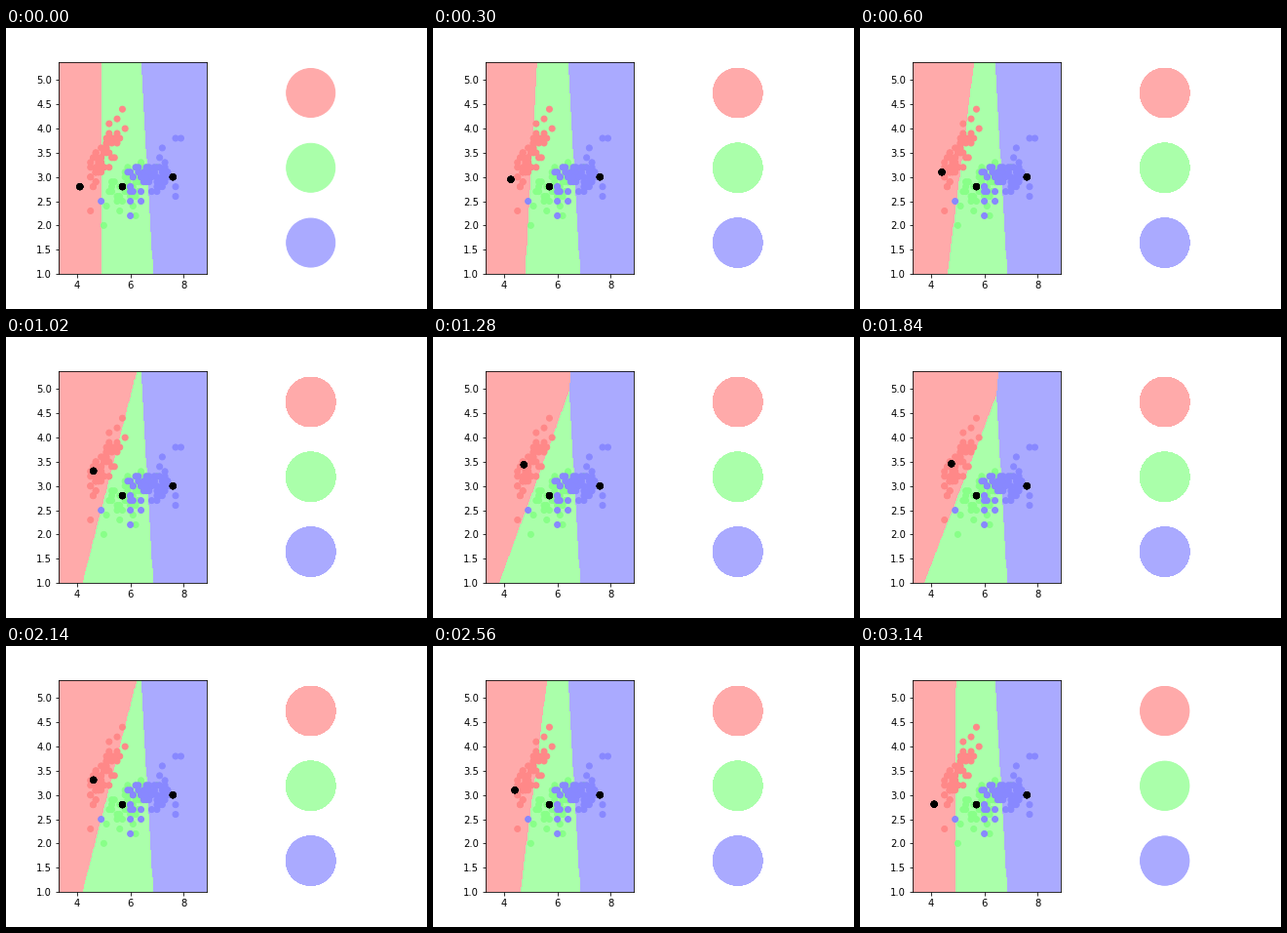
These frames come from a looping animation (432x288 px, 3160 ms). A matplotlib script:

```python
import numpy as np
import matplotlib.pyplot as plt
from matplotlib.animation import FuncAnimation
from matplotlib.colors import ListedColormap

plt.rcParams["font.family"] = "DejaVu Sans"

FRAMES, INTERVAL = 158, 20
STEP = 0.02
X0, X1, Y0, Y1 = 3.3, 8.88, 1.0, 5.38
LIGHT = ["#FFAAAA", "#AAFFAA", "#AAAAFF"]
BOLD = ["#FF8888", "#88FF88", "#8888FF"]
rng = np.random.default_rng(4)


def cluster(mean, spread, corr, outliers, n=50, reach=1.7):
    """Correlated normal cloud, rounded to tenths, with its outlying points."""
    z = rng.standard_normal((n, 2))
    z /= np.maximum(1, np.hypot(*z.T) / reach)[:, None]
    z[:, 1] = corr * z[:, 0] + np.sqrt(1 - corr ** 2) * z[:, 1]
    return np.vstack([np.round(mean + z * spread, 1), outliers])


def wave(i):
    return min(i, FRAMES - i)


def centers(i):
    shift = 0.01 * wave(i)
    return np.array([(4.1 + shift, 2.8 + shift), (5.7, 2.8), (7.6, 3.0)])


fig, (ax, key) = plt.subplots(1, 2, figsize=(6, 4), dpi=72)
fig.subplots_adjust(left=0.125, right=0.9, bottom=0.125, top=0.88, wspace=0.2)
ax.set(xlim=(X0, X1), ylim=(Y0, Y1))

# One sample per screen pixel, snapped down to the classifier's grid.
width, height = ax.bbox.size
cols, rows = int(width), int(height)
dx, dy = (X1 - X0) / width, (Y1 - Y0) / height


def snapped(start, count, size):
    return start + STEP * np.floor((np.arange(count) + 0.5) * size / STEP)


xx, yy = np.meshgrid(snapped(X0, cols, dx), snapped(Y0, rows, dy))


def regions(c):
    return np.argmin([(xx - x) ** 2 + (yy - y) ** 2 for x, y in c], axis=0)


mesh = ax.imshow(regions(centers(0)), cmap=ListedColormap(LIGHT), vmin=0, vmax=2,
                 extent=(X0, X0 + cols * dx, Y0, Y0 + rows * dy),
                 origin="lower", aspect="auto", interpolation="nearest")

clouds = [
    cluster((5.0, 3.4), (0.33, 0.34), 0.75,
            [(4.5, 2.3), (5.2, 4.1), (5.5, 4.2), (5.7, 4.4), (5.8, 4.0)]),
    cluster((5.9, 2.78), (0.48, 0.3), 0.53, [(5.0, 2.0), (6.2, 2.2), (7.0, 3.2)]),
    cluster((6.55, 2.95), (0.5, 0.25), 0.4,
            [(4.9, 2.5), (6.0, 2.2), (7.2, 3.6), (7.7, 2.6), (7.7, 2.8),
             (7.7, 3.8), (7.9, 3.8)]),
]
for cloud, color in zip(clouds, BOLD):
    ax.scatter(*cloud.T, s=36, color=[color] * len(cloud), linewidths=1)

# Overlaid copies give the dots and discs their hard edges.
LAYERS = 8
dots = ax.scatter(*np.tile(centers(0), (LAYERS, 1)).T, s=36, linewidths=1,
                  color=["black"] * 3 * LAYERS, zorder=3)
ax.set(xlim=(X0, X1), ylim=(Y0, Y1), xticks=[4, 6, 8],
       yticks=np.arange(1, 5.1, 0.5))

discs = np.array([(0, 1), (0, 0), (0, -1)])
legend = key.scatter(*discs.T, s=2500, color=LIGHT, linewidths=1)
key.set(xlim=(-1, 1), ylim=(-1.416, 1.416))
key.axis("off")


def update(i):
    c = centers(i)
    mesh.set_data(regions(c))
    dots.set_offsets(np.tile(c, (LAYERS, 1)))
    legend.set_offsets(np.tile(discs, (wave(i) + 1, 1)))
    return mesh, dots, legend


anim = FuncAnimation(fig, update, frames=FRAMES, interval=INTERVAL,
                     repeat=True, repeat_delay=0)
plt.show()
```
